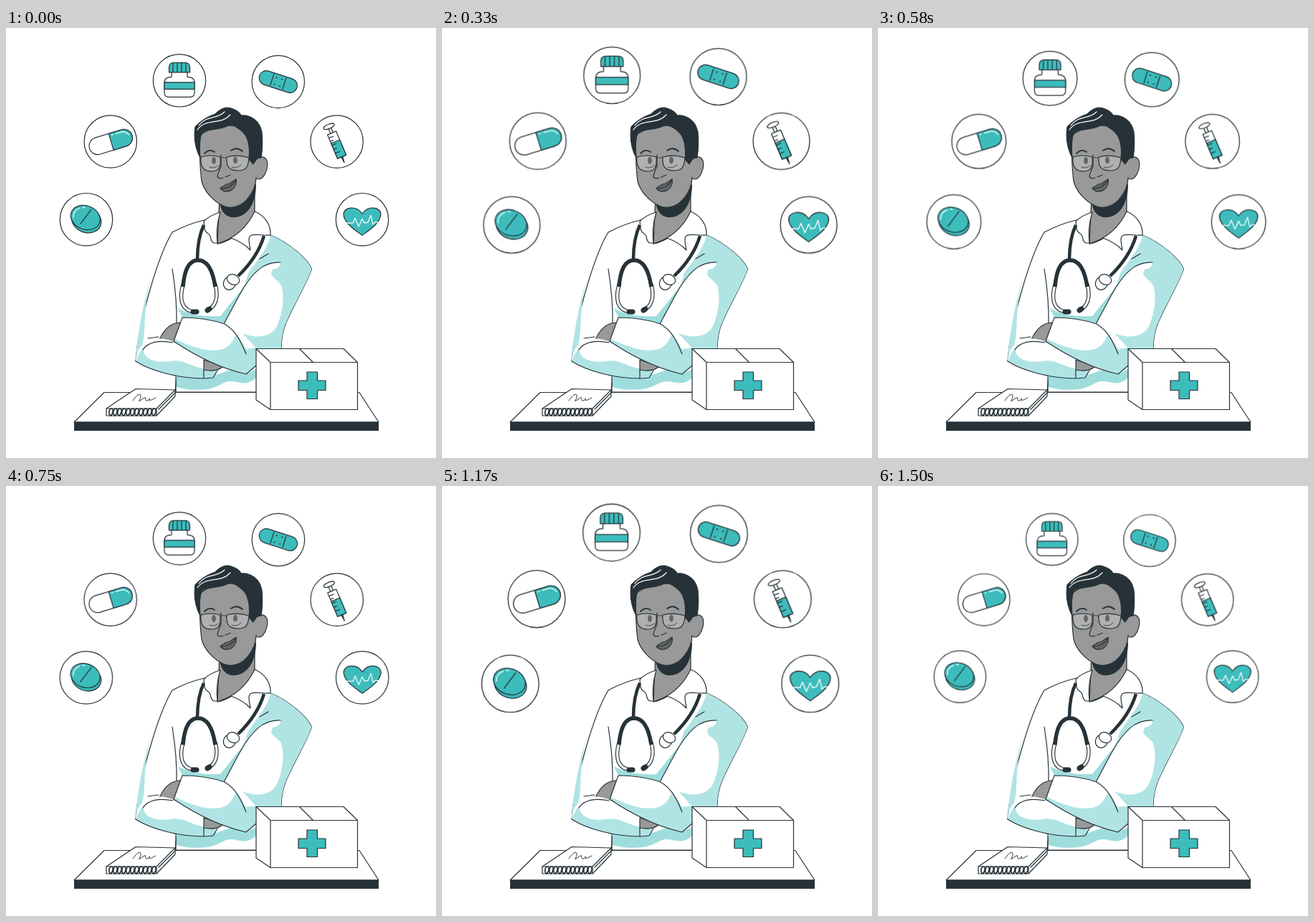
Write an HTML page without scripts that moves like this. It is 600 px wide and 600 px high and loops after 1.54 s.

```html
<!DOCTYPE html>
<html lang="en">
<head>
<meta charset="utf-8">
<title>Doctor</title>
<style>
  html, body { margin: 0; width: 100%; height: 100%; overflow: hidden; background: #fff; }
  svg { display: block; width: 100%; height: 100%; }
  .ink { fill: none; stroke: #263238; stroke-width: 1.2; stroke-linecap: round; stroke-linejoin: round; }
  .white { fill: #fff; }
  .teal { fill: #3dbcbc; }
  .skin { fill: #999; }
  .dark { fill: #263238; }
  .shade { fill: #b0e4e4; stroke: none; }
  .deep { fill: #9fdddd; }
  .plain { stroke: none; }
  .shine { stroke: #fff; }
  .tube { stroke-width: 4.5; }
  #icons { transform-origin: 304.5px 168.5px; animation: beat 1540ms infinite cubic-bezier(.37, 0, .63, 1); }
  @keyframes beat {
    0% { transform: scale(1); }
    4.9% { transform: scale(.988); }
    26.6% { transform: scale(1.089); animation-timing-function: cubic-bezier(.4, 0, .75, .7); }
    37.7% { transform: scale(1.032); animation-timing-function: cubic-bezier(.3, .4, .7, .9); }
    54.4% { transform: scale(.992); }
    77.3% { transform: scale(1.088); }
    97.4%, 100% { transform: scale(.988); }
  }
</style>
</head>
<body>
<svg viewBox="0 0 600 600" class="ink">
  <defs>
    <circle id="disc" r="36.7" class="white"/>
    <path id="ring" d="M0 11C-4 9-2 1 1 1S4 8 0 11" stroke-width="1.7"/>
  </defs>

  <g id="icons">
    <g transform="translate(112 267.2)">
      <use href="#disc"/>
      <ellipse class="teal" cx=".6" cy="1" rx="21" ry="17" transform="rotate(20)"/>
      <ellipse class="teal" cx="-2" cy="-2.200" rx="21" ry="16.500" transform="rotate(20)"/>
      <path d="M-8 6 7-14"/>
      <path class="shine" d="M-18-3Q-18-13-9-16M-5-17-2-17"/>
    </g>

    <g transform="translate(145.8 158.5)">
      <use href="#disc"/>
      <g transform="translate(.4 .5) rotate(-17)">
        <rect class="white" x="-31" y="-12" width="62" height="24" rx="12"/>
        <path class="teal" d="M.5-12H19A12 12 0 0 1 19 12H.5Z"/>
        <path class="shine" d="M10-9H18Q25-8 27-2M4-9H6"/>
      </g>
    </g>

    <g transform="translate(242 73.3)">
      <use href="#disc"/>
      <path class="white" d="M-11-12H11V-5Q21-5 21 3V17Q21 23 15 23H-15Q-21 23-21 17V3Q-21-5-11-5Z"/>
      <path class="teal" d="M-21 2.500H21V12H-21Z"/>
      <path class="teal" d="M-14.500-11.500V-19Q-14-25-8-25H8Q14-25 14.500-19V-11.500Z"/>
      <path d="M-9-24V-12M-3-25V-12M3-25V-12M9-24V-12"/>
    </g>

    <g transform="translate(379.8 75)">
      <use href="#disc"/>
      <g transform="rotate(18)">
        <rect class="teal" x="-27.500" y="-10" width="55" height="20" rx="10"/>
        <path d="M-9-8V8M9-8V8"/>
        <path d="M-4-5h.1M4-5h.1M-4 5h.1M4 5h.1" stroke-width="2"/>
      </g>
    </g>

    <g transform="translate(461.6 158.6)">
      <use href="#disc"/>
      <g transform="translate(0 4.500) rotate(-23)">
        <path class="white" d="M-2-28H2V-18H-2Z"/>
        <ellipse class="white" cy="-28" rx="8" ry="3"/>
        <path class="white" d="M-6.500-18H6.500V18H-6.500Z"/>
        <path class="teal" d="M-6.500-5H6.500V18H-6.500Z"/>
        <path d="M-6-13H0M-6-8H-2M-6-2H0M-6 4H-2M-6 10H0"/>
        <path class="dark" d="M-1 18H1L0 27Z"/>
      </g>
    </g>

    <g transform="translate(497 267.2)">
      <use href="#disc"/>
      <path class="teal" d="M0 22C-11 14-25 5-26-7-26-18-8-20 0-8 8-20 26-18 26-7 25 5 11 14 0 22Z"/>
      <path class="shine" d="M-22 5H-13L-10-2-5 10 0-1 3 5 8 4 12-6 15 7 18 4H22"/>
    </g>
  </g>

  <!-- desk -->
  <path class="white" d="M137 508.500H493L520 550H95Z"/>
  <path class="dark plain" d="M95 549.500H520V562H95Z"/>

  <!-- coat -->
  <path class="white" d="M277 268C260 272 245 278 232 285 212 318 185 410 181 465L238 486 236 508H350V448H384C384 432 387 420 391 411 401 387 421 354 426.500 336 421 323 396 300 369 289L347 256Z"/>
  <path class="shade" d="M369 289C396 300 421 323 426.500 336 421 354 401 387 391 411 387 420 384 432 384 448H350L330 426C353 435 372 430 379 414 386 397 389 374 384 359 376 348 366 347 372 337Q383 336 383 327C358 327 343 342 326 372L303 413 330 366 338 342C352 322 366 306 369 289Z"/>
  <path class="shade deep" d="M240 391Q262 404 299 402L328 366 342 345 326 372 304 413 246 404Z"/>
  <path class="shade" d="M205 341C193 376 183 425 181 465L189 446C197 425 189 388 205 341Z"/>
  <path class="shade deep" d="M237 485 293 484 322 474 349 476V488C337 500 326 494 315 493 303 492 298 502 279 504 263 506 248 504 238 501Z"/>
  <path d="M232 336Q239 380 238 415M237 487V508M383 327C358 326 343 342 326 372L304 413M354 322 366 315"/>

  <!-- folded arms -->
  <path class="skin" d="M214 435C220 421 229 412 242 411L248 414 236 441Z"/>
  <path class="white plain" d="M181 465C182 450 190 436 207 434Q221 432 234 438L278 463 277 489C241 489 203 479 181 465Z"/>
  <path class="shade" d="M181 465Q186 451 192 446C190 462 209 468 228 465 252 461 255 475 293 478V486L277 489C241 489 203 479 181 465Z"/>
  <path d="M191 449C198 438 214 435 233 439M181 465C203 479 241 489 277 489L289 488 295 478M276 477V489M198 433 213 431"/>
  <path class="skin" d="M276 463 303 472C296 479 286 479 276 477Z"/>
  <path class="white plain" d="M246 404C267 404 287 407 305 413 322 423 329 440 335 455L349 465V476L335 483C300 475 265 458 234 437Z"/>
  <path class="shade" d="M236 434C262 447 289 455 307 446 315 441 318 433 321 427L335 448 349 446V471L335 483C300 475 265 458 235 437Z"/>
  <path d="M335 455C329 440 322 423 305 413 287 407 267 404 246 404L234 437C265 458 300 475 335 483L349 471"/>

  <!-- neck and collar -->
  <path class="skin" d="M298 235 295 301Q325 295 347 262V220Z"/>
  <path class="dark plain" d="M298 242C300 262 313 268 328 262 341 256 349 240 349 218Z"/>
  <path class="white" d="M299 257C289 260 281 264 276 270 277 278 276 284 282 287S283 297 290 300H295C293 284 295 270 299 257Z"/>
  <path class="white" d="M347 256C362 262 370 276 369 289 360 290 350 287 343 289 336 291 340 301 341 310 333 301 322 296 314 293 308 296 303 300 295 301 318 294 336 279 347 256Z"/>

  <!-- stethoscope -->
  <path class="tube" d="M276 275Q267 294 267 323M360 290Q351 320 324 346" stroke-linecap="butt"/>
  <g id="tubes">
    <path d="M247 358C241 380 246 394 262 396M292 358C297 376 292 390 281 393" stroke-width="5.500"/>
    <path class="shine" d="M247 358C241 380 246 394 262 396M292 358C297 376 292 390 281 393" stroke-width="3.200"/>
  </g>
  <path d="M247 361C249 335 256 324 268 324S288 335 292 361" stroke-width="5.500" stroke-linecap="butt"/>
  <path d="M261 396H266M281 394 284 392" stroke-width="7"/>
  <ellipse class="white" cx="312" cy="356" rx="8.500" ry="9.500" transform="rotate(25 312 356)"/>
  <ellipse class="white" cx="317" cy="351" rx="9" ry="7" transform="rotate(25 317 351)"/>

  <!-- head -->
  <path class="skin" d="M346 186C352 178 361 178 364 185 367 195 360 211 353 211L348 210Z"/>
  <path class="skin" d="M270 150C270 175 271 199 273 214 277 229 290 242 303 248 317 254 330 247 338 237 346 227 349 217 349 208L346 150Q310 122 270 150Z"/>
  <path class="skin plain" d="M341 187H350V208H341Z"/>
  <path class="dark" d="M271 181C264 168 262 152 264 138 273 128 283 123 292 120 300 112 308 110 314 112 320 114 326 117 328 122 342 121 354 130 357 145 358 158 358 170 356 181 349 181 347 186 345 190L339 183C341 166 338 150 328 143 318 135 313 134 306 138 293 143 281 140 273 147 269 157 270 170 271 181Z"/>
  <path class="shine" d="M267 142C279 125 300 136 313 121M269 136C281 121 294 128 305 117"/>

  <!-- face -->
  <g fill="#b0b0b0">
    <path d="M272 180Q285 176 299 180C300 194 297 200 287 200 275 200 271 193 272 180Z"/>
    <path d="M308 180Q323 176 339 181C338 194 335 199 324 199 311 199 307 193 308 180Z"/>
  </g>
  <path d="M299 182Q303 179 308 182M339 182 348 180M284 194Q290 197 296 192M315 194Q321 197 328 191" stroke-width=".8"/>
  <g fill="#666" stroke="none">
    <ellipse cx="290" cy="185" rx="3" ry="5"/>
    <ellipse cx="320" cy="184.500" rx="3" ry="5"/>
  </g>
  <path d="M277 175Q284 168 291 173M314 171Q322 165 330 172" stroke-width="1.800"/>
  <path d="M300 177V193C297 200 295 204 295 208Q298 211 303 209M306 208 313 205"/>
  <path d="M299 224Q307 217 312 217L321 211Q323 220 315 226 306 231 299 224Z" fill="#666"/>
  <path d="M300 224Q314 224 321 212"/>

  <!-- first-aid box -->
  <path class="white" d="M349 447.500H471L490.500 466.500V532.500H369L349 519Z"/>
  <path d="M349 447.500 369 466.500H490.500M369 466.500V532.500M410 448 428 466"/>
  <path class="teal" d="M420 480H434.500V492H446V505.500H434.500V517.500H420V505.500H408V492H420Z"/>

  <!-- notebook -->
  <path class="white" d="M181 503.500 236 505V514L210 541H140V531Z"/>
  <path d="M140 531H210L236 505M210 531V541M213 532 236 509"/>
  <path d="M177 520C181 514 187 508 188 513S181 524 190 518 192 519 196 520 201 514 200 518 206 517 209 516" stroke-width="1"/>
  <g transform="translate(146 530)">
    <use href="#ring"/><use href="#ring" x="6"/><use href="#ring" x="12"/><use href="#ring" x="18"/>
    <use href="#ring" x="24"/><use href="#ring" x="30"/><use href="#ring" x="36"/><use href="#ring" x="42"/>
    <use href="#ring" x="48"/><use href="#ring" x="54"/><use href="#ring" x="60"/>
  </g>
</svg>
</body>
</html>
```
